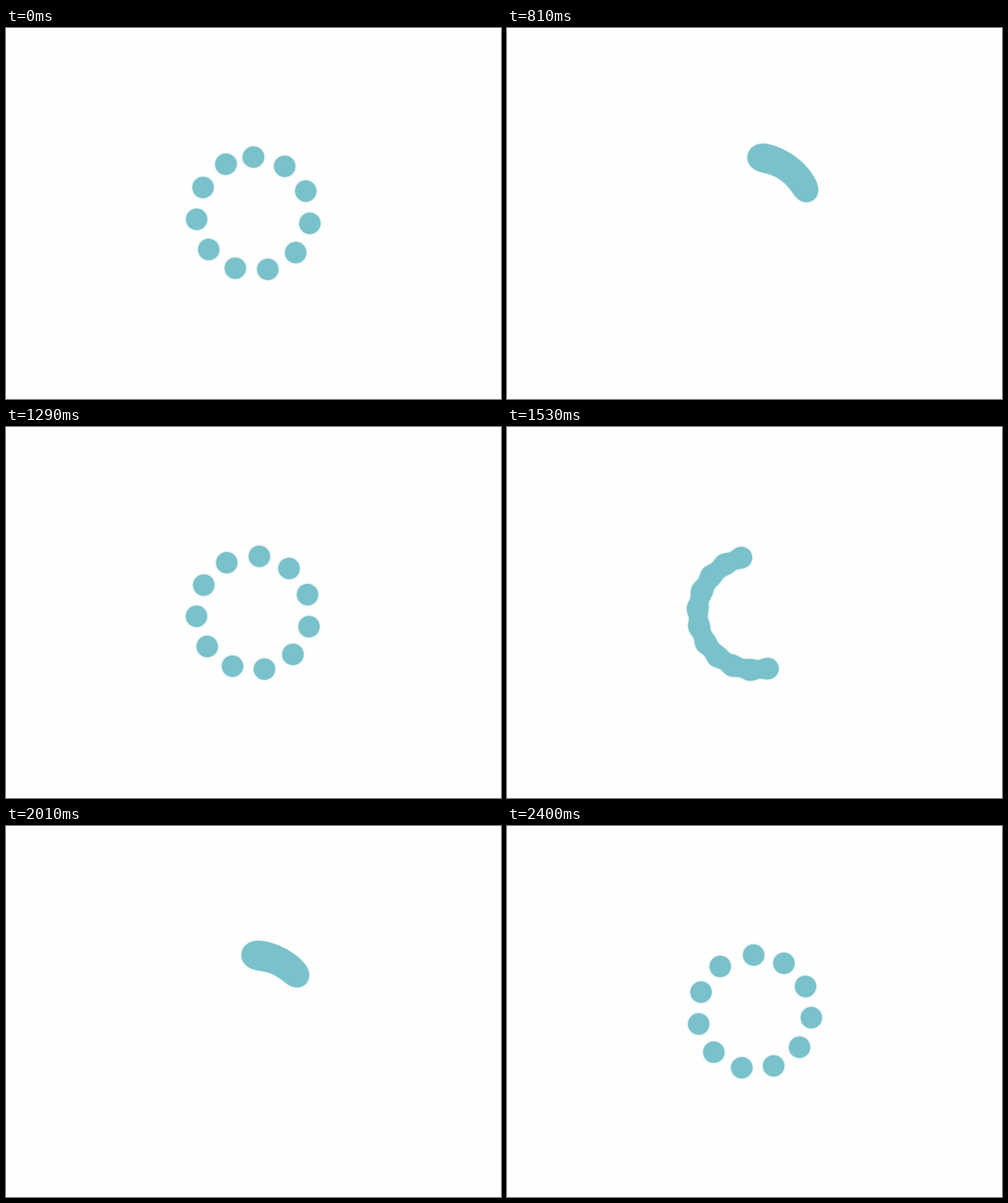
Recreate the animation shown at these times as an HTML page. Size 800 by 600 pixels, loop 2.43 s.

```html
<!DOCTYPE html>
<html lang="en">
<head>
<meta charset="utf-8">
<title>Gooey loader</title>
<style>
html, body { margin: 0; width: 100%; height: 100%; overflow: hidden; background: #fefefe; }
svg { display: block; width: 100vw; height: 100vh; }
</style>
</head>
<body>
<svg viewBox="0 0 800 600">
  <defs>
    <radialGradient id="soft"></radialGradient>
    <filter id="goo" filterUnits="userSpaceOnUse" x="240" y="140" width="320" height="320" color-interpolation-filters="sRGB">
      <feColorMatrix in="SourceGraphic" result="rim" values="0 0 0 0 .918  0 0 0 0 .953  0 0 0 0 .953  0 0 0 18 -6.5"/>
      <feColorMatrix in="SourceGraphic" result="body" values="0 0 0 0 .475  0 0 0 0 .761  0 0 0 0 .796  0 0 0 18 -8.5"/>
      <feMerge><feMergeNode in="rim"/><feMergeNode in="body"/></feMerge>
    </filter>
  </defs>
  <g id="balls" filter="url(#goo)"></g>
</svg>
<script>
const NS = 'http://www.w3.org/2000/svg';
const LOOP = 2430, CYCLE = LOOP / 2, STEP = 30, COUNT = 11;
const CX = 400, CY = 301, ORBIT = 92.3;
const SIZE = 17.3, BLUR = 7.2, REACH = 40;

function add(parent, tag, attrs) {
  const el = document.createElementNS(NS, tag);
  for (const k in attrs) el.setAttribute(k, attrs[k]);
  return parent.appendChild(el);
}

// Soft disc: half opaque at SIZE, fading out to REACH
const soft = document.getElementById('soft');
for (let i = 0; i <= 40; i++) {
  const r = REACH * i / 40;
  const a = i === 40 ? 0 : 1 / (1 + Math.exp(1.702 * (r - SIZE) / BLUR));
  add(soft, 'stop', { offset: i / 40, 'stop-color': '#000', 'stop-opacity': a });
}
const group = document.getElementById('balls');
const balls = Array.from({ length: COUNT }, () =>
  add(group, 'circle', { r: REACH, fill: 'url(#soft)' }));

// Smooth curve through [time, value] keys
function curve(keys, t) {
  let i = 0;
  while (i < keys.length - 2 && t > keys[i + 1][0]) i++;
  const slope = j => {
    if (j === 0) return 0;
    const a = keys[j - 1], b = keys[Math.min(j + 1, keys.length - 1)];
    return (b[1] - a[1]) / (b[0] - a[0]);
  };
  const [t0, v0] = keys[i], [t1, v1] = keys[i + 1];
  const h = t1 - t0, x = Math.min(1, Math.max(0, (t - t0) / h));
  const s = x * x * (3 - 2 * x);
  return v0 + (v1 - v0) * s
    + h * slope(i) * x * (1 - x) * (1 - x)
    - h * slope(i + 1) * x * x * (1 - x);
}

const FAN = [[600, 0], [700, .04], [802, .168], [945, .57], [1080, .865], [1185, .979], [1215, 1]];
const SWAY = [[0, 0], [75, 4.5], [330, 4.3], [810, 4.7], [1290, 5], [1530, 5], [2010, 0], [2400, -.9], [2430, 0]];

function gather(t) {
  const x = Math.min(1, Math.max(0, (t - 10) / 630));
  return x < .5 ? .5 * (2 * x) ** 3.4 : 1 - .5 * (2 - 2 * x) ** 3.4;
}

function angle(i, t) {
  const p = t % CYCLE, u = i / (COUNT - 1);
  const sway = curve(SWAY, t);
  if (p < 605) {
    const rest = u * (327 + 4 * Math.max(0, 1 - p / 75));
    return sway + rest + (360 - rest) * gather(p);
  }
  const e = curve(FAN, p);
  return sway + 331 * e * u ** (1 + .3 * (1 - e));
}

function draw(t) {
  balls.forEach((ball, i) => {
    const a = angle(i, t) * Math.PI / 180;
    ball.setAttribute('cx', (CX + ORBIT * Math.sin(a)).toFixed(2));
    ball.setAttribute('cy', (CY - ORBIT * Math.cos(a)).toFixed(2));
  });
}

let start = null;
function frame(now) {
  if (start === null) start = now;
  draw(Math.floor(((now - start) % LOOP) / STEP) * STEP);
  requestAnimationFrame(frame);
}
draw(0);
requestAnimationFrame(frame);
</script>
</body>
</html>
```
